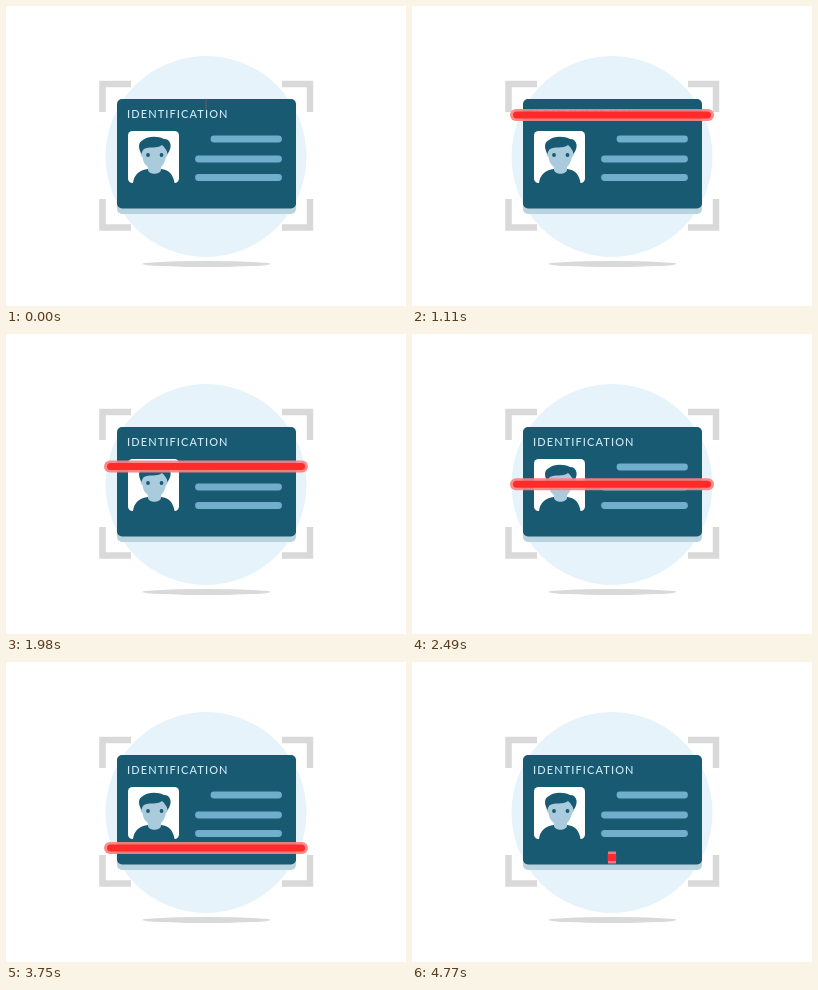
Recreate the animation shown at these times as an HTML page. Size 400 px wide and 300 px high, loop 4.8 s.

```html
<!DOCTYPE html>
<html lang="en">
<head>
<meta charset="utf-8">
<title>Identification scan</title>
<style>
  html, body { margin: 0; width: 100%; height: 100%; overflow: hidden; background: #fff; }
  svg { display: block; width: 100%; height: 100%; }
  text { font: 500 11px Lato, sans-serif; letter-spacing: 1.1px; fill: #cfe9f5; }
</style>
</head>
<body>
<svg viewBox="0 0 400 300">
  <circle cx="200" cy="150.5" r="100.5" fill="#e6f3fa"/>
  <ellipse cx="200.5" cy="258" rx="64" ry="3" fill="#d9d9d9"/>
  <path d="M96.5 106V78H125M276 78H304V106M96.5 193V221.5H125M276 221.5H304V193"
        fill="none" stroke="#d9d9d9" stroke-width="6.5"/>

  <rect x="111" y="98" width="179" height="110" rx="5" fill="#b9d3df"/>
  <rect x="111" y="93" width="179" height="109.5" rx="5" fill="#175a72"/>
  <text x="121" y="112">IDENTIFICATION</text>
  <path d="M208 133H272.5M192.5 153H272.5M192.5 171.5H272.5"
        stroke="#70aecb" stroke-width="6.8" stroke-linecap="round"/>

  <rect x="122" y="125" width="51" height="52" rx="4.5" fill="#fff"/>
  <path d="M127 177C128 168 134 164 142 163H155C163 164 167 168 168.5 177Z" fill="#175a72"/>
  <path d="M136 143C138 141 150 142 155 138C158 140 161 141 161.5 144C163 146 162 150 160 151C159 156 157 159 155 161V164C154 169 143 169 142 164V161C139 159 137 156 136.500 151C134 150 134 145 136 143Z" fill="#a9cbdc"/>
  <path d="M135.500 148C132 142 132 136 137 134C142 130 152 130 158 133C165 133 167 141 161.500 148C161 144 159 142 156 139C151 143 143 140 138 143C136.500 144 136 146 135.500 148Z" fill="#175a72"/>
  <g fill="#175a72">
    <circle cx="142" cy="149" r="1.9"/>
    <circle cx="155.500" cy="149" r="1.900"/>
  </g>

  <g id="beam">
    <rect x="-102" y="-6" width="204" height="12" rx="6" fill="#f98282" fill-opacity=".92"/>
    <rect x="-99" y="-3.500" width="198" height="7" rx="3.500" fill="#ff2b2b"/>
  </g>
</svg>
<script>
  const LOOP = 4800, GROW = 930, TOP = 98.3, BOTTOM = 195.6;
  const beam = document.getElementById('beam');

  const easeInOut = u => {
    const a = u ** 1.74, b = (1 - u) ** 1.74;
    return a / (a + b);
  };
  const grow = u => u * (1.28 + u * (0.44 - 0.72 * u));

  function draw(now) {
    const t = now % LOOP;
    const y = TOP + (BOTTOM - TOP) * easeInOut(t / LOOP);
    const width = grow(Math.min(1, t / GROW, (LOOP - t) / GROW));
    beam.setAttribute('transform', `translate(200 ${y}) scale(${width} 1)`);
  }

  const start = performance.now();
  function tick() {
    draw(performance.now() - start);
    requestAnimationFrame(tick);
  }
  draw(0);
  requestAnimationFrame(tick);
</script>
</body>
</html>
```
